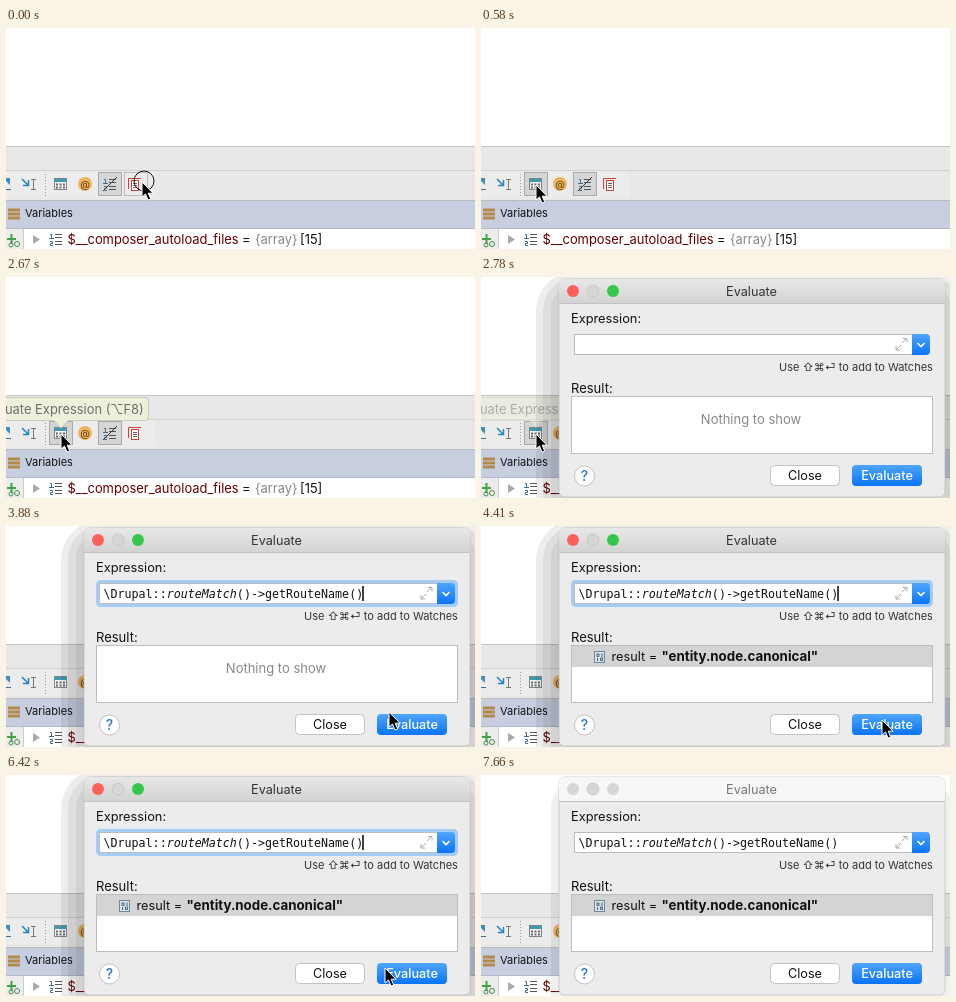
An HTML page for the animation above (7710 ms loop, 469 by 221 pixels).

```html
<!DOCTYPE html>
<html lang="en">
<head>
<meta charset="utf-8">
<title>Evaluate expression</title>
<style>
html, body { margin: 0; width: 100%; height: 100%; overflow: hidden; background: #fff; }
svg { display: block; width: 469px; height: 221px; }
text { font: 12.7px Inter, "Open Sans", sans-serif; fill: #111; white-space: pre; }
.mid { text-anchor: middle; }
.mono { font: 11.67px "DejaVu Sans Mono", monospace; }
.row text { font-size: 12.9px; }
.line { fill: none; stroke-width: 1; }
</style>
</head>
<body>
<svg viewBox="0 0 469 221">
  <defs>
    <linearGradient id="titleFill" x2="0" y2="1"><stop stop-color="#e8e8e8"/><stop offset="1" stop-color="#d3d3d3"/></linearGradient>
    <linearGradient id="blueFill" x2="0" y2="1"><stop stop-color="#4fa5fb"/><stop offset="1" stop-color="#0a74f8"/></linearGradient>
    <g id="numbered" class="line">
      <path d="M6 1.5H13M6 4.5H13M6 8.5H13M6 11.5H13" stroke="#555"/>
      <path d="M1 1.5H2.5V5M0 5.5H5M1 8.5H3.5V10.500H1.500V12.500H4" stroke="#456b8c"/>
    </g>
  </defs>

  <!-- debugger panel -->
  <rect width="469" height="221" fill="#fff"/>
  <rect y="118" width="469" height="56" fill="#e8e8e8"/>
  <path d="M0 118.5H469" stroke="#c4c4c4"/>
  <path d="M0 142.5H469" stroke="#d0d0d0"/>
  <rect y="143" width="149" height="27" fill="#ececec"/>
  <path d="M0 172.5H469" stroke="#bcbcbc"/>
  <rect y="173" width="469" height="27" fill="#c6cee0"/>
  <path d="M0 200.5H469" stroke="#b4bac8"/>
  <rect y="201" width="17" height="20" fill="#ececec"/>
  <path d="M17.5 201V221" stroke="#ccc"/>

  <!-- toolbar -->
  <g class="line">
    <path d="M0 150H4V157L0 153" fill="#3c8fc0"/>
    <path d="M0 161.5H5" stroke="#456b8c"/>
    <path d="M16 151L22 157M22.500 152V157.500H17" stroke="#2585ba" stroke-width="1.5"/>
    <path d="M25 151.500H30M27.500 152V161M25 161.500H30" stroke="#777"/>
    <path d="M39.5 146V168" stroke="#999" stroke-dasharray="1 2"/>
    <g id="evalHover"><rect x="43.5" y="144.5" width="23" height="23" fill="#d4d4d4" stroke="#a9a9a9"/></g>
    <rect x="48.5" y="150.5" width="12" height="11" fill="#f4f4f4" stroke="#7b858b"/>
    <rect x="49" y="151" width="11" height="3" fill="#3c9cae"/>
    <path d="M50 156.5H59M50 159.5H59" stroke="#666" stroke-width="2" stroke-dasharray="2 1.5"/>
    <circle cx="79" cy="156" r="7" fill="#efb45c"/>
    <rect x="92.5" y="144.5" width="23" height="23" fill="#d6d6d6" stroke="#a9a9a9"/>
    <use href="#numbered" x="97" y="150"/>
    <path d="M97 163L111 149" stroke="#333"/>
    <g id="copyHover"><rect x="118.5" y="144.5" width="23" height="23" fill="#ececec" stroke="#b9b9b9"/></g>
    <path d="M122.500 161V150.500H135" stroke="#c94436"/>
    <rect x="125.5" y="152.5" width="7" height="10" fill="#fff" stroke="#c94436"/>
    <path d="M127 155.500H131M127 157.500H131M127 159.500H131" stroke="#666"/>
  </g>
  <text class="mid" x="79" y="159.5" style="font-size:10px;fill:#553a10">@</text>

  <!-- variables -->
  <path d="M2 182H14M2 186H14M2 190H14" stroke="#b18a4c" stroke-width="3"/>
  <text x="19" y="189" style="font-size:11px">Variables</text>
  <path d="M1 211H10M5.500 206V216" stroke="#43a047" stroke-width="2"/>
  <g class="line" stroke="#4c8c4c"><circle cx="5" cy="217" r="2"/><circle cx="11" cy="216" r="2.5"/></g>
  <path d="M27 207L34 211.5L27 216Z" fill="#aaa"/>
  <use href="#numbered" x="43" y="205"/>
  <g class="row">
    <text x="61.5" y="216" style="fill:#660000">$__composer_autoload_files</text>
    <text x="236" y="216">=</text>
    <text x="249" y="216" style="fill:#888">{array}</text>
    <text x="294" y="216">[15]</text>
  </g>

  <g id="tip">
    <path d="M-5 120.5H139Q142.5 120.5 142.5 124V139Q142.5 143.5 139 143.5H62L55 151L48 143.5H-5Z" fill="#eff0dc" stroke="#c9cabb"/>
    <text x="-1" y="137" style="font-size:12.9px;fill:#6e6e6e">uate Expression (⌥F8)</text>
  </g>

  <!-- dialog -->
  <g id="dialog">
    <g opacity=".07">
      <rect id="farShadow" x="55" y="-6" width="440" height="300" rx="40"/>
    </g>
    <rect id="midShadow" x="62" y="1" width="420" height="300" rx="32" opacity=".06"/>
    <rect x="70" y="8" width="401" height="300" rx="24" opacity=".06"/>
    <rect x="78" y="2" width="386" height="218" rx="5" fill="#ececec" stroke="#b5b5b5" stroke-width=".6"/>
    <path id="bar" d="M78 26V7Q78 2 83 2H459Q464 2 464 7V26Z"/>
    <path d="M78 26.5H464" stroke="#c3c3c3"/>
    <g id="lights"><circle cx="92" cy="14" r="6"/><circle cx="112" cy="14" r="6" stroke="#c0c0c0" stroke-width=".7"/><circle cx="132" cy="14" r="6"/></g>
    <text id="title" class="mid" x="270.5" y="18.5">Evaluate</text>

    <text x="90" y="46" style="font-size:12.8px">Expression:</text>
    <rect id="ring" x="91.5" y="55.5" width="359" height="24" rx="3" fill="#8cbcf2" stroke="#a5ccf5" stroke-width="3"/>
    <rect x="93.5" y="57.5" width="340" height="20" fill="#fff" stroke="#bcbcbc"/>
    <path d="M431 57H445Q449 57 449 61V74Q449 78 445 78H431Z" fill="url(#blueFill)"/>
    <path class="line" d="M436.5 66L440 69.5L443.5 66" stroke="#fff" style="stroke-width:1.6"/>
    <path class="line" d="M421 66L426 61M422 61.5H426V65.5M420 68L415 73M415 69V73H419" stroke="#aaa"/>
    <g id="code">
      <text class="mono" x="97.5" y="72">\Drupal::<tspan font-style="italic">routeMatch</tspan>()-&gt;getRouteName()</text>
    </g>
    <path id="caret" d="M357 60V75" stroke="#000" stroke-width="1.5"/>
    <text x="298" y="94" style="font-size:11px;fill:#333">Use ⇧⌘⏎ to add to Watches</text>

    <text x="90" y="116" style="font-size:13px">Result:</text>
    <rect x="90.5" y="119.5" width="361" height="57" fill="#fff" stroke="#bdbdbd"/>
    <text id="empty" class="mid" x="270" y="147" style="font-size:13px;fill:#888">Nothing to show</text>
    <g id="result">
      <rect x="91" y="120" width="360" height="21" fill="#d4d4d4"/>
      <rect x="113.5" y="125.5" width="10" height="11" fill="#d5e2ea" stroke="#6f8797"/>
      <path class="line" d="M116 128H118V130.5H116ZM121 127.5V131M116.5 132V135M119.5 132H121.5V134.5H119.5Z" stroke="#48677c"/>
      <text x="130.5" y="135">result =</text>
      <text x="180.5" y="135" style="font-size:13.3px;font-weight:700">"entity.node.canonical"</text>
    </g>

    <circle cx="103.5" cy="199" r="10" fill="#fff" stroke="#c2c2c2"/>
    <text class="mid" x="103.5" y="204" style="font-size:14px;font-weight:500;fill:#2a78c8">?</text>
    <rect x="289.5" y="188.5" width="69" height="20" rx="4" fill="#fff" stroke="#c2c2c2"/>
    <text class="mid" x="324" y="203">Close</text>
    <rect x="371" y="188" width="70" height="21" rx="4" fill="url(#blueFill)"/>
    <rect id="press" x="371" y="188" width="70" height="21" rx="4" fill="#0050c0" opacity=".4"/>
    <text class="mid" x="406" y="203" style="font-weight:500;fill:#fff">Evaluate</text>
  </g>

  <g id="mouse">
    <circle id="click" cx="2" cy="-1" r="10" class="line" stroke="#111"/>
    <path d="M0 0V15L3.5 12L6 18L8.7 17L6.2 11.2H11Z" fill="#000" stroke="#fff"/>
  </g>
</svg>
<script>
const LOOP = 7710;
const $ = id => document.getElementById(id);
const show = (id, on) => $(id).style.display = on ? "" : "none";
const within = (t, ...spans) => spans.some(([a, b]) => t >= a && t < b);
const ramp = (t, a, b) => Math.min(1, Math.max(0, (t - a) / (b - a)));

// time, x, y of the pointer tip
const path = [
  [0, 136, 154], [60, 136, 154], [580, 55, 157], [3010, 55, 157], [3120, 106, 160],
  [3300, 106, 160], [3880, 383, 186], [4060, 401, 194], [4530, 401, 194], [5000, 330, 137],
  [5120, 330, 137], [5350, 165, 137], [5760, 165, 137], [6420, 379, 193], [6540, 379, 193],
  [7010, 352, 223], [LOOP, 352, 223]
];

function pointer(t) {
  const i = path.findIndex(p => p[0] > t);
  const [a, x, y] = path[i - 1], [b, u, v] = path[i];
  const k = ramp(t, a, b), e = k * k * (3 - 2 * k);
  return [x + (u - x) * e, y + (v - y) * e];
}

function draw(t) {
  const [x, y] = pointer(t);
  const active = t < 7600;

  $("mouse").setAttribute("transform", `translate(${x} ${y})`);
  show("click", within(t, [0, 60], [2550, 2660], [4300, 4400]));
  show("copyHover", t < 3010 && x > 118);
  show("evalHover", t < 3010 && x < 67);
  $("tip").style.opacity = t < 1840 ? 0
    : t < 2720 ? 0.92 + 0.08 * ramp(t, 1840, 1950)
    : 1 - ramp(t, 2720, 2840);

  show("dialog", t >= 2720);
  show("farShadow", active);
  show("midShadow", active);
  $("bar").setAttribute("fill", active ? "url(#titleFill)" : "#f6f6f6");
  $("title").style.fill = active ? "#333" : "#777";
  ["#fc605b", "#d6d6d6", "#34c84a"].forEach((color, i) =>
    $("lights").children[i].setAttribute("fill", active ? color : "#d6d6d6"));

  show("ring", t >= 2840 && active);
  show("code", t >= 3300);
  show("caret", within(t, [3300, 4800], [5300, 5800], [6300, 6850], [7370, 7600]));
  show("empty", t < 4400);
  show("result", t >= 4400);
  show("press", within(t, [4300, 4400]));
}

function tick() {
  draw(performance.now() % LOOP);
  requestAnimationFrame(tick);
}
tick();
</script>
</body>
</html>
```
